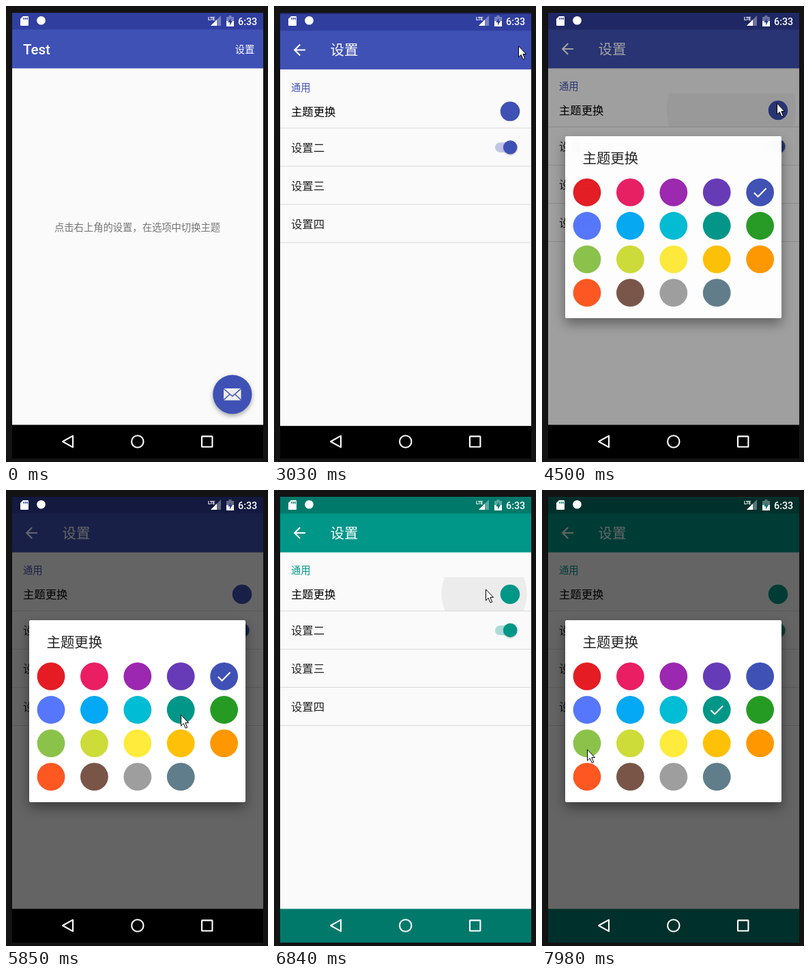
An HTML page that plays this animation: 384x669 px, repeating every 8 s.

```html
<!DOCTYPE html>
<html lang="zh-CN">
<head>
<meta charset="utf-8">
<title>主题更换</title>
<style>
  html, body { margin: 0; width: 100%; height: 100%; overflow: hidden; background: #131313; }
  svg {
    display: block; width: 384px; height: 669px;
    font: 14.31px Roboto, 'Noto Sans CJK SC', 'Noto Sans CJK', sans-serif;
    --primary: #3f51b5; --dark: #303f9f; --nav: #000;
  }
  svg.teal { --primary: #009688; --dark: #00796b; --nav: #00796b; }
  .primary { fill: var(--primary); }
  .dark { fill: var(--dark); }
  .nav { fill: var(--nav); }
  .white { fill: #fff; }
  .ink { fill: #212121; }
  .row { font-size: 16.36px; }
  .title { font-size: 20.44px; }
  .medium { font-weight: 500; }
  .line { fill: none; stroke: #fff; stroke-width: 2.1; }
  .fab { filter: drop-shadow(0 3px 3px #0005); }
  .thumb { filter: drop-shadow(0 1px 1px #0004); }
  #dialog { filter: drop-shadow(0 8px 9px #0006); }
</style>
</head>
<body>
<svg viewBox="0 0 384 669">
  <defs>
    <clipPath id="screen"><rect x="9" y="10" width="368" height="654"/></clipPath>
    <clipPath id="firstRow"><rect x="9" y="128" width="368" height="49.5"/></clipPath>
    <g id="window">
      <rect class="nav" x="9" y="10" width="368" height="654"/>
      <rect x="9" y="91" width="368" height="523.5" fill="#fafafa"/>
      <rect class="dark" x="9" y="10" width="368" height="25"/>
      <rect class="primary" x="9" y="34.5" width="368" height="57"/>
    </g>
  </defs>

  <g clip-path="url(#screen)">
    <rect x="9" y="10" width="368" height="654"/>

    <g id="home">
      <use href="#window"/>
      <circle id="press" class="white" cx="351.5" cy="62.5" r="17.5" opacity=".15"/>
      <text class="white title medium" x="25" y="71">Test</text>
      <text class="white" x="335.7" y="68.5">设置</text>
      <text x="71" y="330" fill="#757575">点击右上角的设置，在选项中切换主题</text>
      <circle class="primary fab" cx="331.8" cy="569.8" r="28.6"/>
      <rect x="319" y="561" width="25.5" height="17.5" rx="1" fill="#eee"/>
      <path d="M319 561.5L331.8 572.5L344.5 561.5M319 578L328 569.5M344.5 578L335.5 569.5"
            fill="none" stroke="var(--primary)" stroke-width="1.5"/>
    </g>

    <g id="settings">
      <use href="#window"/>
      <path class="line" d="M46 63H30.5M38.2 55L30.2 63L38.2 71"/>
      <text class="white title" x="82.5" y="70.7">设置</text>
      <text class="primary" x="25" y="123">通用</text>
      <g clip-path="url(#firstRow)"><circle id="ripple" cy="152"/></g>
      <text class="row" x="25" y="159">主题更换</text>
      <circle class="primary" cx="346" cy="153" r="14.3"/>
      <text class="row ink" x="25" y="212">设置二</text>
      <text class="row ink" x="25" y="268">设置三</text>
      <text class="row ink" x="25" y="324">设置四</text>
      <path d="M9 177.5H377M9 233.5H377M9 289.5H377M9 345.5H377" stroke="#000" stroke-opacity=".13"/>
      <rect class="primary" x="324" y="198.8" width="30" height="14.3" rx="7.1" opacity=".3"/>
      <circle class="primary thumb" cx="346.3" cy="205.8" r="10.2"/>
    </g>

    <rect id="dim" x="9" y="10" width="368" height="654"/>

    <g id="dialog">
      <rect class="white" x="34" y="191" width="317" height="267" rx="2"/>
      <text class="title ink" x="59.5" y="231">主题更换</text>
      <g id="swatches"></g>
      <path id="check" class="line" d="M-8.8 .5L-3 6.3L9 -5.8"/>
    </g>

    <g id="system">
      <path class="white" d="M25 15H32Q33 15 33 16V28Q33 29 32 29H22Q21 29 21 28V19Z"/>
      <path class="dark" d="M25.5 17h1.4v3h-1.4zM28 17h1.4v3H28zM30.5 17h1.4v3h-1.4z"/>
      <circle class="white" cx="51.5" cy="21.3" r="6.3"/>
      <path class="white" d="M300 29L315 14V29Z" opacity=".35"/>
      <path class="white" d="M300 29L309 20V29Z"/>
      <text class="white" x="296" y="20.5" font-size="7" font-weight="700" textLength="10.5" lengthAdjust="spacing">LTE</text>
      <path class="white" d="M323 16H326.5V14H330.5V16H334V30H323Z" opacity=".35"/>
      <path class="white" d="M323 22H334V30H323Z"/>
      <path class="dark" d="M329.5 17.5L325.2 24H328V28.5L332 22H329.5Z"/>
      <text class="white medium" x="340" y="27.5">6:33</text>
      <path class="line" d="M83 639L98 630.6V647.4Z" stroke-linejoin="round"/>
      <circle class="line" cx="192.8" cy="639" r="8.7"/>
      <rect class="line" x="287" y="631.4" width="15.4" height="15.4" rx=".5"/>
    </g>
  </g>

  <path id="cursor" d="M.5 .8V17L4.2 13.5L7.2 20.3L9.7 19.2L6.8 12.6H11.6Z" fill="#fff" stroke="#000"/>
</svg>

<script>
const $ = id => document.getElementById(id);
const root = document.querySelector('svg');
const LOOP = 8000;
const INDIGO = 4, TEAL = 8;
const COLORS = ('e51c23 e91e63 9c27b0 673ab7 3f51b5 5677fc 03a9f4 00bcd4 009688 259b24 ' +
  '8bc34a cddc39 ffeb3b ffc107 ff9800 ff5722 795548 9e9e9e 607d8b').split(' ');

// Pointer path: time, x, y
const POINTER = [
  [520, 386, 48], [750, 344, 64], [1530, 344, 64], [1800, 287, 169], [2050, 374, 50],
  [2190, 358, 58], [3240, 358, 58], [3570, 315, 134], [4080, 315, 134], [4110, 330, 147],
  [4140, 344, 142], [4590, 344, 142], [5130, 258, 325], [5280, 256, 329], [5860, 256, 329],
  [6060, 299, 200], [6300, 310, 137], [6550, 310, 137], [6600, 310, 145], [7170, 310, 145],
  [7590, 46, 316], [7980, 66, 380]
];

const clamp = v => Math.max(0, Math.min(1, v));
const progress = (t, start, length) => clamp((t - start) / length);
const easeOut = (p, power = 2) => 1 - (1 - p) ** power;
const set = (id, attrs) => {
  for (const name in attrs) $(id).setAttribute(name, attrs[name]);
};
const show = (id, visible) => { $(id).style.display = visible ? '' : 'none'; };
const swatchAt = i => [66 + i % 5 * 63.4, 273.4 + Math.floor(i / 5) * 49.1];

$('swatches').innerHTML = COLORS.map((color, i) => {
  const [x, y] = swatchAt(i);
  return `<circle cx="${x}" cy="${y}" r="20.4" fill="#${color}"/>`;
}).join('');

function pointerAt(t) {
  const next = POINTER.findIndex(key => key[0] > t);
  if (next < 0) return POINTER.at(-1).slice(1);
  const [t0, x0, y0] = POINTER[Math.max(0, next - 1)];
  const [t1, x1, y1] = POINTER[next];
  const p = progress(t, t0, t1 - t0 || 1);
  return [x0 + (x1 - x0) * p, y0 + (y1 - y0) * p];
}

function drawPages(t) {
  const opening = t >= 2850;
  show('press', t >= 2580 && !opening);
  show('settings', opening);
  show('home', t < 3250);
  set('home', { opacity: 1 - .3 * progress(t, 2830, 220) });
  set('settings', {
    opacity: progress(t, 2810, 200),
    transform: `translate(0 ${52 * (1 - easeOut(progress(t, 2790, 350), 3))})`
  });
  root.classList.toggle('teal', t >= 5970);
}

function drawDialog(t) {
  const second = t >= 6400;
  const age = t - (second ? 6879 : 4311);
  const visibleFrom = second ? 6810 : 4350;
  const open = t >= visibleFrom;
  const alpha = open ? easeOut(clamp(age / 220)) : 0;
  const shade = open ? .6 * clamp((age - 39) / 248) : 0;
  const closing = second ? 0 : progress(t, 5880, 150);
  const clearing = second ? 0 : progress(t, 5880, 237);

  set('dialog', { opacity: alpha * (1 - closing) });
  set('dim', { opacity: shade * (1 - clearing) });
  set('check', { transform: `translate(${swatchAt(second ? TEAL : INDIGO)})` });
  set('ripple', {
    cx: 303 - .135 * age,
    r: Math.max(0, 68 + .14 * age),
    opacity: open ? .055 * clamp(1.1 - age / 400) : 0
  });
}

function draw(t) {
  drawPages(t);
  drawDialog(t);
  show('cursor', t >= 540);
  set('cursor', { transform: `translate(${pointerAt(t)})` });
}

const begin = performance.now();
function tick() {
  draw((performance.now() - begin) % LOOP);
  requestAnimationFrame(tick);
}
tick();
</script>
</body>
</html>
```
